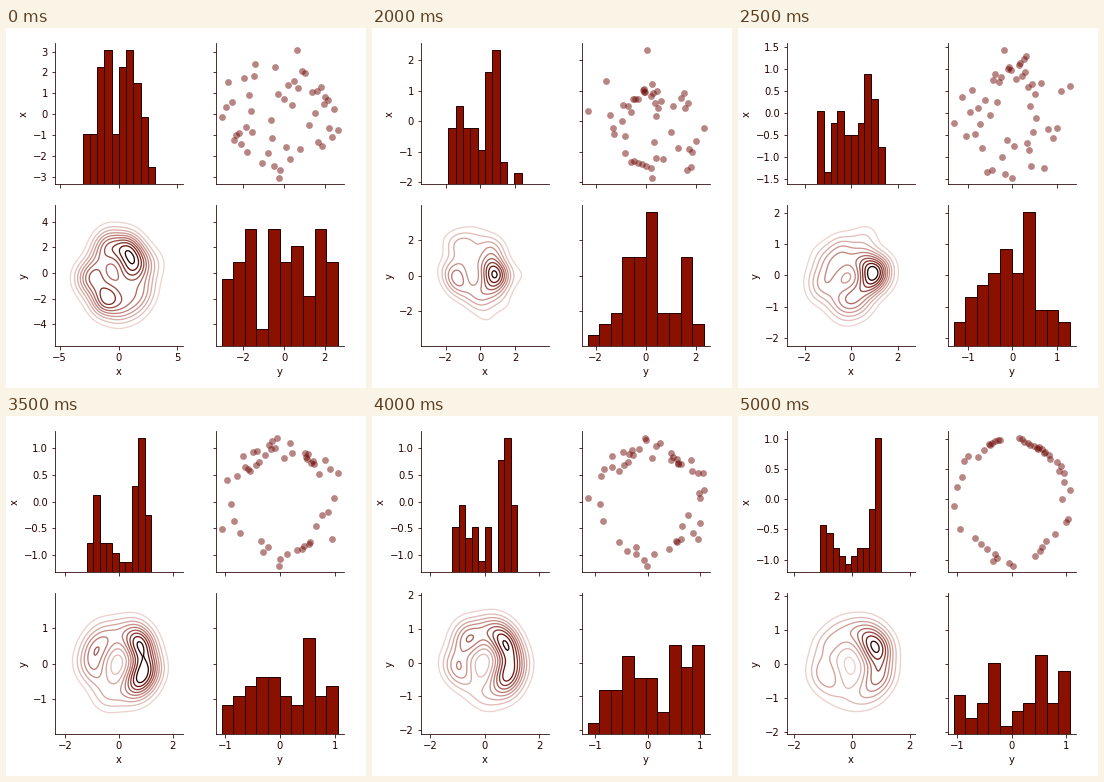
Write a matplotlib script that moves like this. It is 360 px wide and 360 px high and loops after 7000 ms.

```python
import numpy as np
import matplotlib.pyplot as plt
from matplotlib.animation import FuncAnimation
from matplotlib.colors import LinearSegmentedColormap

INK, RED, DOT = "#280000", "#8a1000", "#700c08"
SHADES = LinearSegmentedColormap.from_list("shades", [
    (0, "#f8e8e4"), (0.5, "#bc7a72"), (0.8, "#701810"), (0.92, "#1c0000"), (1, "#1c0000")])
plt.rcParams.update({
    "font.family": "DejaVu Sans", "font.size": 10, "text.color": INK,
    "axes.edgecolor": INK, "axes.labelcolor": INK, "xtick.color": INK, "ytick.color": INK})

rng = np.random.default_rng(7)


def fill(lo, hi, *counts):
    """Sorted values from lo to hi that fall into equal bins as counted."""
    u = np.concatenate([k + (np.arange(n) + rng.uniform(0.2, 0.8, n)) / n
                        for k, n in enumerate(counts)])
    u[0], u[-1] = 0, len(counts)
    return lo + (hi - lo) * u / len(counts)


def settle(x, y, tol, sweeps=8):
    """Swap y values until the points lie near the unit circle."""
    def miss(a, b):
        return max(abs(a * a + b * b - 1) - tol, 0)

    for _ in range(sweeps):
        for i in range(len(x)):
            for j in range(i):
                kept = miss(x[i], y[i]) + miss(x[j], y[j])
                if miss(x[i], y[j]) + miss(x[j], y[i]) < kept:
                    y[i], y[j] = y[j], y[i]


def population(tol, poles, heading, pull, xs, ys):
    """Noisy ring, denser towards its poles, ranked onto the values xs and ys."""
    t = np.linspace(-np.pi, np.pi, len(xs), endpoint=False) + heading
    a = t - pull / poles * np.sin(poles * (t - heading))
    ring = np.array([np.cos(a), np.sin(a)])
    ring += rng.normal(0, min(0.45, tol / 4), ring.shape)
    x, y = (v[r.argsort().argsort()] for v, r in zip((xs, ys), ring))
    settle(x, y, tol)
    return x, y


def blend(a, b):
    """Halfway through resampling: half of each neighbour."""
    return tuple(np.r_[u[::2], v[1::2]] for u, v in zip(a, b))


# tolerance, poles, heading, pull, then range and bin counts of x and of y
wide = population(10, 2, 0.85, 0.8,
                  fill(-3.05, 3.1, 3, 3, 7, 8, 3, 7, 8, 6, 4, 1),
                  fill(-3.08, 2.65, 4, 5, 7, 1, 7, 5, 6, 3, 7, 5))
loose = population(4.6, 2, 0.7, 0.6,
                   fill(-2.03, 2.35, 6, 5, 7, 5, 2, 7, 8, 5, 3, 2),
                   fill(-2.32, 2.32, 3, 7, 1, 5, 5, 11, 4, 3, 9, 2))
disc = population(1.15, 1, -0.3, 0.3,
                  fill(-1.47, 1.45, 6, 1, 5, 6, 4, 4, 5, 9, 7, 3),
                  fill(-1.32, 1.29, 2, 4, 5, 6, 8, 6, 11, 3, 3, 2))
band = population(0.42, 1, 0.2, 0.3,
                  fill(-1.19, 1.19, 3, 8, 3, 3, 2, 1, 1, 9, 14, 6),
                  fill(-1.07, 1.06, 3, 4, 5, 6, 6, 4, 3, 10, 4, 5))
ring = population(0.26, 1, 0.65, 0.5,
                  fill(-1.09, 1.14, 5, 7, 2, 3, 0, 4, 1, 10, 10, 8),
                  fill(-1.14, 1.07, 3, 4, 3, 8, 2, 3, 3, 9, 7, 8))
circle = population(0.18, 1, 0.65, 0.5,
                    fill(-1.1, 1.02, 6, 5, 3, 2, 1, 2, 3, 3, 8, 17),
                    fill(-1.07, 1.07, 5, 2, 4, 9, 1, 3, 4, 10, 4, 8))

STEPS = [wide] * 3 + [loose, blend(loose, disc), disc, blend(disc, band), band,
                      blend(band, ring), ring] + [circle] * 4

fig = plt.figure(figsize=(5, 5), dpi=72, facecolor="white")


def panel(left, top):
    return fig.add_axes([left / 360, 1 - (top + 140.8) / 360, 128 / 360, 140.8 / 360])


hist_x, cloud = panel(48.9, 15.2), panel(209.7, 15.2)
density, hist_y = panel(48.9, 177.4), panel(209.7, 177.4)


def padded(v, pad):
    return v.min() - pad, v.max() + pad


def margin(v):
    return padded(v, 0.05 * np.ptp(v))


def reach(v):
    """Range of the density: three Scott bandwidths beyond the data."""
    return padded(v, 3 * v.std(ddof=1) * len(v) ** (-1 / 6))


def kde(x, y):
    gx, gy = np.meshgrid(np.linspace(*reach(x), 100), np.linspace(*reach(y), 100))
    (a, b), (_, c) = np.linalg.inv(np.cov(x, y) * len(x) ** (-1 / 3))
    dx, dy = gx[..., None] - x, gy[..., None] - y
    z = np.exp(-(a * dx ** 2 + 2 * b * dx * dy + c * dy ** 2) / 2).mean(axis=-1)
    return gx, gy, z / (2 * np.pi) * np.sqrt(a * c - b * b)


def bars(ax, edges, heights):
    ax.bar(edges[:-1], heights, np.diff(edges), align="edge", color=RED,
           edgecolor=INK, linewidth=1, transform=ax.get_xaxis_transform())


def draw(i):
    x, y = STEPS[i]
    for ax in fig.axes:
        ax.clear()
        ax.spines[["top", "right"]].set_visible(False)

    (nx, ex), (ny, ey) = np.histogram(x), np.histogram(y)
    top = 1.05 * max(nx.max(), ny.max())
    bars(hist_x, ex, nx / top)
    bars(hist_y, ey, ny / top)
    cloud.scatter(y, x, s=46, color=DOT, alpha=0.5, linewidths=0)
    density.contour(*kde(x, y), 10, cmap=SHADES, linewidths=1.3)

    for ax in (hist_x, density):
        ax.set_xlim(reach(x))
    for ax in (cloud, hist_y):
        ax.set_xlim(margin(y))
        ax.tick_params(labelleft=False)
    for ax in (hist_x, cloud):
        ax.set_ylim(margin(x))
        ax.tick_params(labelbottom=False)
    for ax in (density, hist_y):
        ax.set_ylim(reach(y))
    hist_x.set_ylabel("x")
    density.set(xlabel="x", ylabel="y")
    hist_y.set_xlabel("y")
    return []


anim = FuncAnimation(fig, draw, frames=len(STEPS), interval=500, repeat=True,
                     repeat_delay=0, blit=False)
plt.show()
```
